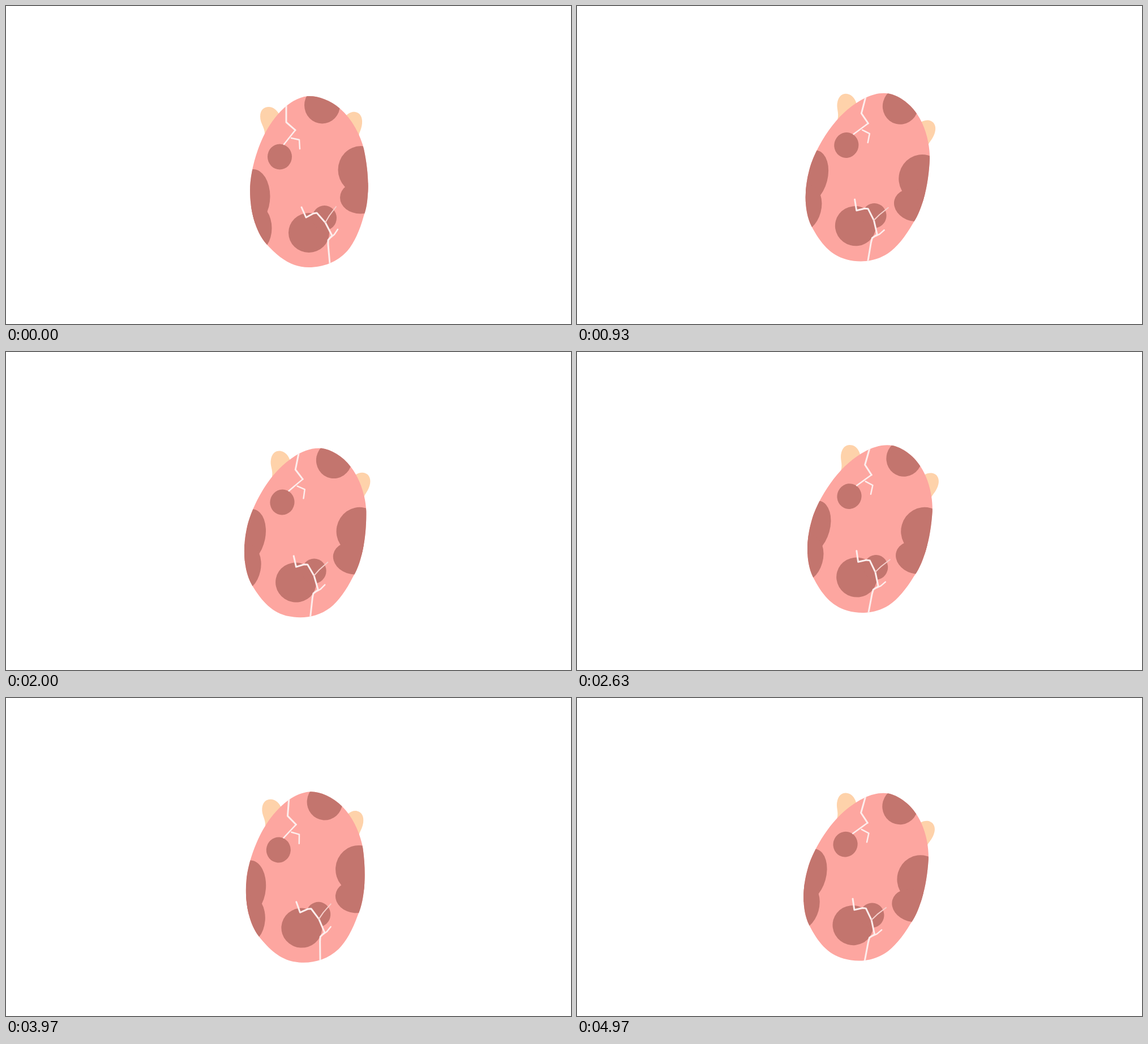
Write an HTML page that moves like this. It is 998 by 561 pixels and loops after 5010 ms.

```html
<!DOCTYPE html>
<html lang="en">
<head>
<meta charset="utf-8">
<title>Wobbling egg</title>
<style>
  html, body { margin: 0; height: 100%; overflow: hidden; background: #fff; }
  svg { display: block; width: 100%; height: 100%; }
</style>
</head>
<body>
<svg viewBox="0 0 998 561">
  <defs>
    <path id="shell" d="M533 159C549 158 572 165 590 181C612 200 626 228 632 252C637 275 640 300 639.5 322C639 345 636 360 632 370C625 396 615 418 603 432C585 452 560 461 535 461C505 461 483 445 460 420C440 397 431 360 431 325C431 295 443 245 466 210C482 186 505 162 533 159Z"/>
    <clipPath id="inside"><use href="#shell"/></clipPath>
  </defs>
  <g id="egg">
    <g fill="#fed2aa">
      <path d="M457 226C457 213 449 208 449 195C449 183 456 178 464 178C472 178 479 184 483 192L470 230Z"/>
      <path d="M600 194C606 188 612 186 617 187C625 188 630 196 629 207C628 218 624 222 623 230L605 230Z"/>
    </g>
    <use href="#shell" fill="#fda6a0"/>
    <g clip-path="url(#inside)">
      <g fill="#c3756e">
        <ellipse cx="558.5" cy="175" rx="31.5" ry="32.5"/>
        <ellipse cx="483.5" cy="266" rx="21.5" ry="22.5"/>
        <ellipse cx="627" cy="289" rx="40.5" ry="42"/>
        <ellipse cx="626" cy="338" rx="36" ry="28.5"/>
        <ellipse cx="437" cy="336" rx="29.5" ry="48"/>
        <ellipse cx="441" cy="392" rx="28.5" ry="42"/>
        <ellipse cx="535" cy="400" rx="36" ry="35"/>
        <ellipse cx="562.5" cy="374" rx="21.5" ry="22"/>
      </g>
      <g fill="none" stroke="#fdeeed" stroke-width="3" stroke-linecap="round" stroke-linejoin="round">
        <path d="M495 172L495 205L511 219"/>
        <path d="M511 219L491 244M504 233L518 236L519 252" stroke-width="2.5"/>
        <path d="M522 355L530 373L543 366L549 365L564 382L576 405L569 413L569 421L572 455"/>
        <path d="M574 408L580 403L586 394" stroke-width="2.5"/>
        <path d="M564 382L571 370L583 354" stroke="#f6cfcb" stroke-width="2"/>
      </g>
    </g>
  </g>
</svg>
<script>
  const LOOP = 5010, FRAME = 100 / 3, LAST = 149;
  const HOME = [535, 310];

  // time, tilt in degrees, centre x, centre y
  const keys = [
    [0, 0, 535, 310],
    [220, 2, 540, 319],
    [380, 6.5, 530, 317],
    [530, 10, 534, 309],
    [930, 14.6, 514.7, 301.1],
    [1085, 15.5, 509.5, 305],
    [1350, 8, 527, 317],
    [1600, 1, 547, 320.5],
    [1700, 1, 550, 320],
    [2000, 11.35, 529.8, 318.3],
    [2130, 13, 525, 312.5],
    [2300, 14.5, 528.5, 309],
    [2630, 15.8, 518.6, 310.9],
    [2900, 12, 526, 313.5],
    [3200, 8.8, 527, 311.5],
    [3430, 9.1, 526.9, 309.1],
    [3730, 6, 527, 311],
    [4220, 3, 533, 320],
    [4370, 2.5, 538.5, 314.2],
    [4590, 3, 540.5, 302],
    [4800, 10, 519, 315],
    [4970, 15.8, 511.6, 314.4]
  ];

  function slope(i, c) {
    const a = keys[Math.max(i - 1, 0)], b = keys[Math.min(i + 1, keys.length - 1)];
    return (b[c] - a[c]) / (b[0] - a[0]);
  }

  // Smooth cubic through the keys
  function pose(t) {
    let i = 0;
    while (i < keys.length - 2 && t >= keys[i + 1][0]) i++;
    const a = keys[i], b = keys[i + 1], span = b[0] - a[0];
    const u = Math.min((t - a[0]) / span, 1), v = 1 - u;
    return [1, 2, 3].map(c =>
      v * v * (1 + 2 * u) * a[c] + u * u * (3 - 2 * u) * b[c] +
      u * v * span * (v * slope(i, c) - u * slope(i + 1, c)));
  }

  const egg = document.getElementById("egg");

  function draw() {
    const step = Math.min(Math.floor((performance.now() % LOOP + 4) / FRAME), LAST);
    const [tilt, x, y] = pose(step * FRAME);
    egg.setAttribute("transform",
      `translate(${x} ${y}) rotate(${tilt}) translate(${-HOME[0]} ${-HOME[1]})`);
    requestAnimationFrame(draw);
  }
  draw();
</script>
</body>
</html>
```
